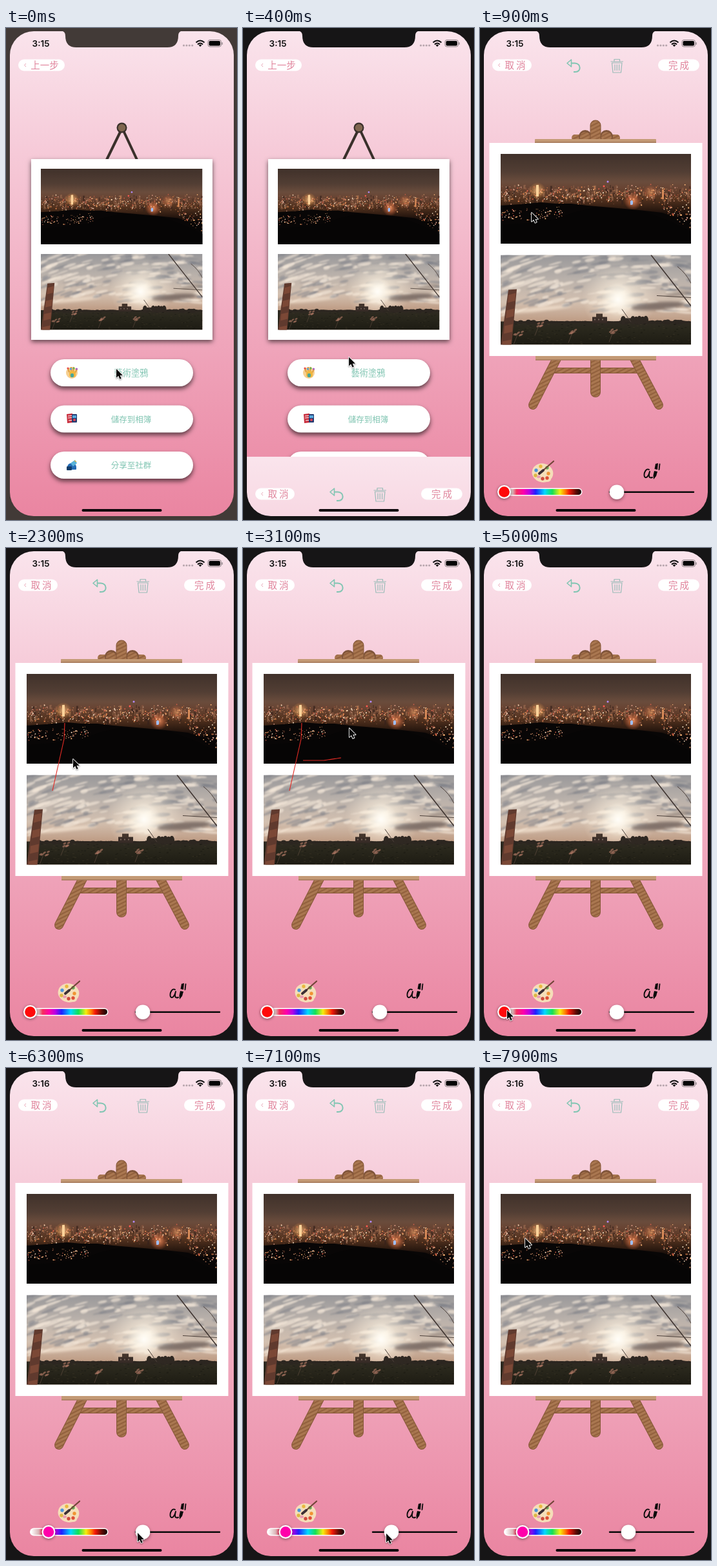
Recreate the animation shown at these times as an HTML page with a canvas. Size 358x762 px, loop 8 s.

```html
<!DOCTYPE html>
<html lang="zh-Hant">
<meta charset="utf-8">
<style>
html, body { margin: 0; width: 100%; height: 100%; overflow: hidden; background: #161516 }
canvas { display: block }
</style>
<canvas id="stage" width="358" height="762"></canvas>
<script>
const W = 358, H = 762, LOOP = 8000;
const CJK = '"Noto Sans CJK TC", "Noto Sans CJK", sans-serif';
const PINK = '#e0849c', TEAL = '#80c5b2';
let g;

function layer(w, h, draw) {
  const c = document.createElement('canvas'), prev = g;
  c.width = w; c.height = h;
  g = c.getContext('2d');
  draw();
  g = prev;
  return c;
}
function box(x, y, w, h, r, fill) {
  g.fillStyle = fill;
  g.beginPath(); g.roundRect(x, y, w, h, r); g.fill();
}
function oval(x, y, rx, ry, fill, turn = 0) {
  g.fillStyle = fill;
  g.beginPath(); g.ellipse(x, y, rx, ry, turn, 0, 7); g.fill();
}
const dot = (x, y, r, fill) => oval(x, y, r, r, fill);
function poly(fill, ...p) {
  g.fillStyle = fill;
  g.beginPath();
  for (let i = 0; i < p.length; i += 2) g.lineTo(p[i], p[i + 1]);
  g.fill();
}
function line(color, width, d) {
  g.strokeStyle = color; g.lineWidth = width;
  g.stroke(new Path2D(d));
}
function label(s, x, y, font, fill) {
  g.font = font; g.fillStyle = fill; g.textAlign = 'center'; g.textBaseline = 'alphabetic';
  g.fillText(s, x, y);
}
function shadow(color, blur, dy, draw) {
  g.save();
  g.shadowColor = color; g.shadowBlur = blur; g.shadowOffsetY = dy;
  draw();
  g.restore();
}
function fade(x0, y0, x1, y1, stops) {
  const f = g.createLinearGradient(x0, y0, x1, y1);
  stops.forEach(([p, c]) => f.addColorStop(p, c));
  return f;
}
function glow(x, y, r, c0, c1) {
  const f = g.createRadialGradient(x, y, 0, x, y, r);
  f.addColorStop(0, c0); f.addColorStop(1, c1);
  dot(x, y, r, f);
}
function seeded(s) {
  return () => (s = (s * 16807) % 2147483647) / 2147483647;
}

// Photos, each in a 295 x 139 space
function photo(x, y, w, h, draw) {
  g.save();
  g.translate(x, y); g.scale(w / 295, h / 139);
  g.beginPath(); g.rect(0, 0, 295, 139); g.clip();
  draw();
  g.restore();
}
function night() {
  const rnd = seeded(77);
  const hues = ['#ffb978', '#e8884e', '#ffe9cc', '#d4604a', '#b87a55', '#8e5f48', '#d99a86'];
  const light = (x, y, s) => {
    g.fillStyle = hues[rnd() * hues.length | 0];
    g.fillRect(x, y, s, s);
  };
  box(0, 0, 295, 139, 0, fade(0, 0, 0, 139,
    [[0, '#40312a'], [.2, '#523e34'], [.31, '#6a4c3c'], [.38, '#684433'], [.5, '#54331f'], [.62, '#2b1910'], [.7, '#0d0807']]));
  for (let i = 0; i < 130; i++) {
    const h = 3 + rnd() * 7;
    box(rnd() * 295, 48 + rnd() * 22, 1 + rnd() * 3, h, 0, ['#8a5b43aa', '#35221baa', '#a5745688'][i % 3]);
  }
  for (let i = 0; i < 560; i++) light(rnd() * 295, 46 + (rnd() + rnd()) * 17, .7 + rnd() * 1.2);
  glow(57, 57, 13, '#ffcf96cc', '#ffa04000');
  glow(205, 73, 14, '#ff9d68cc', '#ff704000');
  glow(232, 60, 12, '#ffb07088', '#ff704000');
  box(55, 48, 4, 18, 1, '#ffd39a');
  box(250, 55, 3, 15, 0, '#d68a58');
  box(201, 72, 4, 7, 2, '#9ec0ff');
  dot(166, 43, 1.5, '#b58cff');
  dot(160, 50, 1.5, '#ff5a50');
  poly('#080606', 0, 80, 30, 78, 62, 75, 85, 77, 110, 77, 135, 80, 170, 83, 215, 87, 250, 91,
    272, 99, 295, 103, 295, 139, 0, 139);
  for (let i = 0; i < 100; i++) {
    const x = rnd() * 95;
    light(x, 86 + rnd() * 18 - x * .05, .8 + rnd());
  }
  for (let i = 0; i < 60; i++) {
    const x = rnd() * 45;
    light(250 + x, 80 + rnd() * (6 + x * .7), .8 + rnd() * 1.2);
  }
  poly('#060505', 0, 110, 40, 107, 85, 101, 112, 91, 145, 83, 180, 85, 225, 90, 262, 104, 295, 120,
    295, 139, 0, 139);
}
function sunset() {
  const rnd = seeded(31);
  box(0, 0, 295, 139, 0, fade(0, 0, 0, 104,
    [[0, '#99989a'], [.35, '#b8b0aa'], [.7, '#d3c0b0'], [1, '#bd9a82']]));
  g.save();
  g.filter = 'blur(.8px)';
  for (let i = 0; i < 230; i++) {
    const x = rnd() * 310, y = rnd() * 90;
    oval(x, y, 4 + rnd() * 13, .8 + rnd() * 2.6, rnd() < .58 ? '#f4e7d9a0' : '#7e808880', -.4 + x / 600);
  }
  g.restore();
  glow(184, 66, 58, '#fff6e6ee', '#fff0dc00');
  glow(182, 69, 26, '#fffdf8', '#fff8ea00');
  g.save();
  g.filter = 'blur(2px)';
  oval(244, 79, 42, 6, '#6f615ccc', -.08);
  oval(276, 60, 20, 4, '#85787188', -.1);
  oval(60, 84, 50, 3, '#fff0dfaa', -.1);
  g.restore();
  box(0, 103, 295, 36, 0, fade(0, 103, 0, 139, [[0, '#302a22'], [.3, '#2a281d'], [1, '#1d1b13']]));
  for (let x = 15; x < 295; x += 4)
    oval(x, 104, 4, 1 + rnd() * (x < 75 || x > 185 ? 3 : 1), '#2c2620');
  for (let x = 190; x < 226; x += 5) oval(x, 101, 4, 3 + rnd() * 4, '#2f2822');
  box(142, 96, 23, 9, 0, '#382c27');
  box(148, 91, 10, 6, 0, '#42342c');
  for (let x = 145; x < 163; x += 6) box(x, 99, 2, 2, 0, '#76655a');
  for (let i = 0; i < 150; i++) box(rnd() * 295, 106 + rnd() * 32, 3, .8, 0, i % 2 ? '#4a412d77' : '#12110c88');
  [[112, 118], [175, 117], [60, 107], [27, 121]].forEach(([x, y]) => {
    line('#6a5245', .6, `M${x} ${y}l-7 18`);
    for (let i = 0; i < 6; i++) oval(x - 6 + rnd() * 13, y - 2 + rnd() * 6, 2.6, 1.4, '#a87461aa', -.5);
  });
  poly('#603a2e', 12, 54, 25, 53, 17, 139, 0, 139);
  for (let y = 62; y < 139; y += 24) poly('#7b4836', 13 - (y - 54) / 8, y, 24 - (y - 54) / 11, y - 3,
    23 - (y - 54) / 11, y + 9, 12 - (y - 54) / 8, y + 12);
  line('#3d322e', 1.5, 'M233 0L295 79');
  line('#4c403a', 1, 'M274 18Q288 29 295 44M242 63L295 66M188 84L202 104');
}

function backdrop() {
  box(0, 0, W, H, 0, fade(0, 5, 0, 756, [[0, '#fae4ec'], [.25, '#f6cad8'], [.6, '#f0a9be'], [1, '#ea85a1']]));
}
function pill(x, w, s, tx, back) {
  box(x, 48.5, w, 18, 9, '#fff');
  label(s, tx, 63, '14.5px ' + CJK, PINK);
  if (back) line('#e8a2b4', 1, 'M31 55l-2.5 2.5 2.5 2.5');
}

const menu = layer(W, H, () => {
  backdrop();
  pill(19, 72, '上一步', 60, true);
  line('#3a302b', 4, 'M179 157L156 204M181 157L203 204');
  dot(179.5, 154.5, 8, '#3a302b');
  dot(179.5, 154.5, 5.8, '#80664f');
  shadow('#0009', 7, 3, () => box(39, 203, 281, 280, 0, '#fff'));
  photo(54, 218, 250.5, 117, night);
  photo(54, 350, 250.5, 117.5, sunset);
  ['藝術塗鴉', '儲存到相簿', '分享至社群'].forEach((s, i) => {
    const y = 513 + i * 71.5;
    shadow('#0009', 7, 4, () => box(69, y, 221, 42, 21, '#fff'));
    label(s, 194, y + 26, `500 ${i ? 12.5 : 13.3}px ${CJK}`, TEAL);
  });
  // painted hand
  dot(102, 534, 9, '#f6cf91');
  line('#e0a04a', 2.4, 'M98 533l-2-6M101 531v-6M104 531l1-6M107 534l3-5');
  box(98, 531, 10, 10, 4, '#efb63f');
  ['#e74b4b', '#4c9de0', '#61b75b', '#a65cc0'].forEach((c, i) => dot(96 + i * 4.5, 527 + (i % 2), 1.6, c));
  box(100, 535, 5, 6, 2, '#46a59b');
  // albums
  poly('#c92f3e', 94, 598, 103, 597, 104, 611, 95, 612);
  line('#fff', 1, 'M96 601l6-.5M96 604l6-.5M97 608l5-.5');
  box(102, 598, 8, 13, 1, '#253c72');
  box(103, 600, 6, 4, 0, '#58aadd');
  dot(106, 607, 2, '#dd4352');
  // mailbox
  box(95, 674, 14, 10, [6, 6, 1, 1], '#246bb4');
  box(94, 679, 8, 6, 1, '#123d69');
  poly('#58b2d9', 100, 674, 107, 669, 110, 674, 104, 679);
  line('#e0b642', 1.5, 'M106 670l3 2');
});

const grain = layer(12, 12, () => {
  box(0, 0, 12, 12, 0, '#a4714b');
  line('#8d5d3b', 1.2, 'M-2 5L14 -3M-2 11L14 3M-2 17L14 9');
  line('#b3835c', .8, 'M-2 8L14 0M-2 14L14 6');
});

function easel() {
  const wood = g.createPattern(grain, 'repeat');
  const beam = (d, w) => {
    line('#855838', w, d);
    line(wood, w - 2, d);
  };
  g.lineCap = 'round';
  beam('M112 530.5H246', 9);
  beam('M119 512L82 584', 14);
  beam('M239 512L277 584', 14);
  beam('M179 510V564', 16);
  box(142, 165, 75, 10, 5, wood);
  for (const x of [163, 196]) {
    dot(x, 168, 10, '#80553a');
    dot(x, 169, 8, wood);
  }
  beam('M179 151V180', 17);
  g.lineCap = 'butt';
  box(85, 172, 188, 7, 1, '#c39a75');
  box(86, 507, 187, 7.5, 1, '#c39a75');
  line('#94694a', 1.2, 'M85 177H273M86 514H273');
}

const editor = layer(W, H, () => {
  backdrop();
  pill(19, 61, '取 消', 54.5, true);
  pill(276, 64, '完 成', 308, false);
  // undo
  line(TEAL, 2, 'M142 54.5H147C157 55 157 68 148 68H145');
  g.lineJoin = 'round';
  line(TEAL, 1.6, 'M141.5 49L135 54.5L141.5 60Z');
  // bin
  line('#9abcb8', 1.2, 'M202.5 52H222M208 52V48.5H216.5V52M204.5 54L206 69H218.5L220 54ZM209 56.5V66M212.3 56.5V66M215.6 56.5V66');
  easel();
  box(14.5, 178, 330, 330, 0, '#fff');
  photo(32, 195, 295, 139, night);
  photo(32, 351.5, 295, 139, sunset);
  // palette
  oval(97, 689, 16.5, 14.5, '#f5deb9', .25);
  oval(104, 699, 6, 4, '#f5deb9');
  oval(91, 695, 3, 2.2, '#eb9fb3');
  [[87, 685, '#4c96d7'], [94, 679, '#e9b83f'], [104, 681, '#67ad59'], [106, 690, '#f09333'],
   [97, 698, '#cf4a3e'], [86, 693, '#ddb640'], [104, 697, '#de5038']].forEach(([x, y, c]) => dot(x, y, 2.7, c));
  g.lineCap = 'round';
  line('#714537', 2.2, 'M114 671L98 685');
  line('#3c3035', 4, 'M98 685L92 690');
  // pen with scribble
  line('#0b0b0b', 1.9, 'M262 684C258 681 253 689 255 695C258 699 262 692 263 687C261 694 262 698 267 696');
  poly('#0b0b0b', 272, 675, 276, 674, 275, 684, 270.5, 683);
  poly('#0b0b0b', 270, 686, 275, 687, 273, 694, 269, 699, 268.5, 693);
  line('#0b0b0b', 1.8, 'M278.5 675.5L277.5 684');
  // tracks
  box(37, 712.5, 121.5, 12, 6, '#fff');
  box(39, 714, 118, 9, 4.5, fade(39, 0, 157, 0, [[0, '#fff'], [.1, '#d8b3b5'], [.15, '#f5305c'], [.24, '#ff00aa'],
    [.32, '#b400e6'], [.4, '#2020ff'], [.52, '#00d8ff'], [.62, '#12e055'], [.72, '#f4ee10'],
    [.79, '#ff7a00'], [.84, '#f51808'], [.93, '#5c0b05'], [1, '#120303']]));
  line('#0a0a0a', 2.4, 'M201 718.7H331');
});

const bezel = color => layer(W, H, () => {
  box(0, 0, W, H, 0, color);
  g.globalCompositeOperation = 'destination-out';
  box(6, 5, 347, 751, 37, '#000');
  g.globalCompositeOperation = 'source-over';
  g.fillStyle = color;
  g.fill(new Path2D('M85 4Q92 5 92 12Q92 30 109 30H250Q267 30 267 12Q267 5 274 4Z'));
  for (let i = 0; i < 4; i++) dot(275.5 + i * 4.4, 27, 1.6, '#b7a5ad');
  line('#111', 2, 'M294.5 22.5Q301 16.5 307.5 22.5M297 25.5Q301 21.5 305 25.5');
  poly('#111', 298.6, 26.8, 301, 25.2, 303.4, 26.8, 301, 29);
  g.strokeStyle = '#8d8286'; g.lineWidth = 1;
  g.beginPath(); g.roundRect(313, 18.5, 20.5, 10.5, 3); g.stroke();
  box(314.5, 20, 17.5, 7.5, 1.8, '#050505');
  box(334.5, 22, 1.3, 4, 1, '#8d8286');
  box(117.5, 745, 124, 4, 2, '#0b0609');
});
const litFrame = bezel('#423a37'), darkFrame = bezel('#161516');

// Pointer path: time, x, y
const path = [[0, 171, 528], [300, 171, 528], [900, 80, 286], [1100, 91, 271], [1300, 90, 296], [1900, 72, 376],
  [2300, 104, 327], [2450, 93, 329], [2700, 125, 329], [2950, 152, 325], [3150, 167, 271], [3650, 167, 390],
  [4000, 216, 54], [4300, 216, 54], [5000, 42, 716], [5300, 42, 716], [5800, 71, 718], [6300, 204, 720],
  [6500, 204, 720], [7000, 222, 721], [7200, 222, 721], [7900, 70, 264], [8000, 70, 264]];
const strokes = [[1100, 1900], [2450, 2950], [3150, 3650]];

function ease(t, a, b) {
  const p = Math.min(1, Math.max(0, (t - a) / (b - a)));
  return p * p * (3 - 2 * p);
}
function pointer(t) {
  const i = path.findIndex(k => k[0] > t), [a, x, y] = path[i - 1], [b, u, v] = path[i];
  const p = ease(t, a, b);
  return [x + (u - x) * p, y + (v - y) * p];
}

g = document.getElementById('stage').getContext('2d');

function drawEditor(t) {
  g.drawImage(editor, 0, 0);
  g.strokeStyle = '#e22a24'; g.lineWidth = 1.1; g.lineJoin = 'round';
  if (t < 4200) for (const [a, b] of strokes) {
    g.beginPath();
    for (let u = a; u <= Math.min(t, b); u += 10) g.lineTo(...pointer(u));
    g.stroke();
  }
  const hue = ease(t, 5300, 5800), hx = 37.5 + 28.5 * hue;
  shadow('#0007', 4, 1, () => dot(hx, 718.5, 10.5, '#fff'));
  dot(hx, 718.5, 8.3, `rgb(255, ${10 * (1 - hue)}, ${10 + 160 * hue})`);
  shadow('#0006', 5, 2, () => dot(212 + 18 * ease(t, 6500, 7000), 718.7, 11.3, '#fff'));
}

function draw(now) {
  const t = now % LOOP, rise = ease(t, 300, 750);
  g.save();
  g.beginPath(); g.roundRect(5, 4, 349, 753, 38); g.clip();
  if (rise < 1) g.drawImage(menu, 0, 0);
  g.translate(0, H * (1 - rise));
  if (rise > 0) drawEditor(t);
  g.restore();
  g.drawImage(t < 100 ? litFrame : darkFrame, 0, 0);
  label(t < 3200 ? '3:15' : '3:16', 54, 29, '600 13.5px Inter, sans-serif', '#111');

  g.save();
  g.translate(...pointer(t));
  g.scale(.86, .86);
  const arrow = new Path2D('M0 0V16L3.7 12.6L6.3 18.3L9 17.1L6.5 11.6H11.5Z');
  g.lineJoin = 'round'; g.strokeStyle = '#fff'; g.lineWidth = 2;
  shadow('#0006', 2, 1, () => g.stroke(arrow));
  g.fillStyle = '#080808';
  g.fill(arrow);
  g.restore();
  requestAnimationFrame(draw);
}
requestAnimationFrame(draw);
</script>
</html>
```
